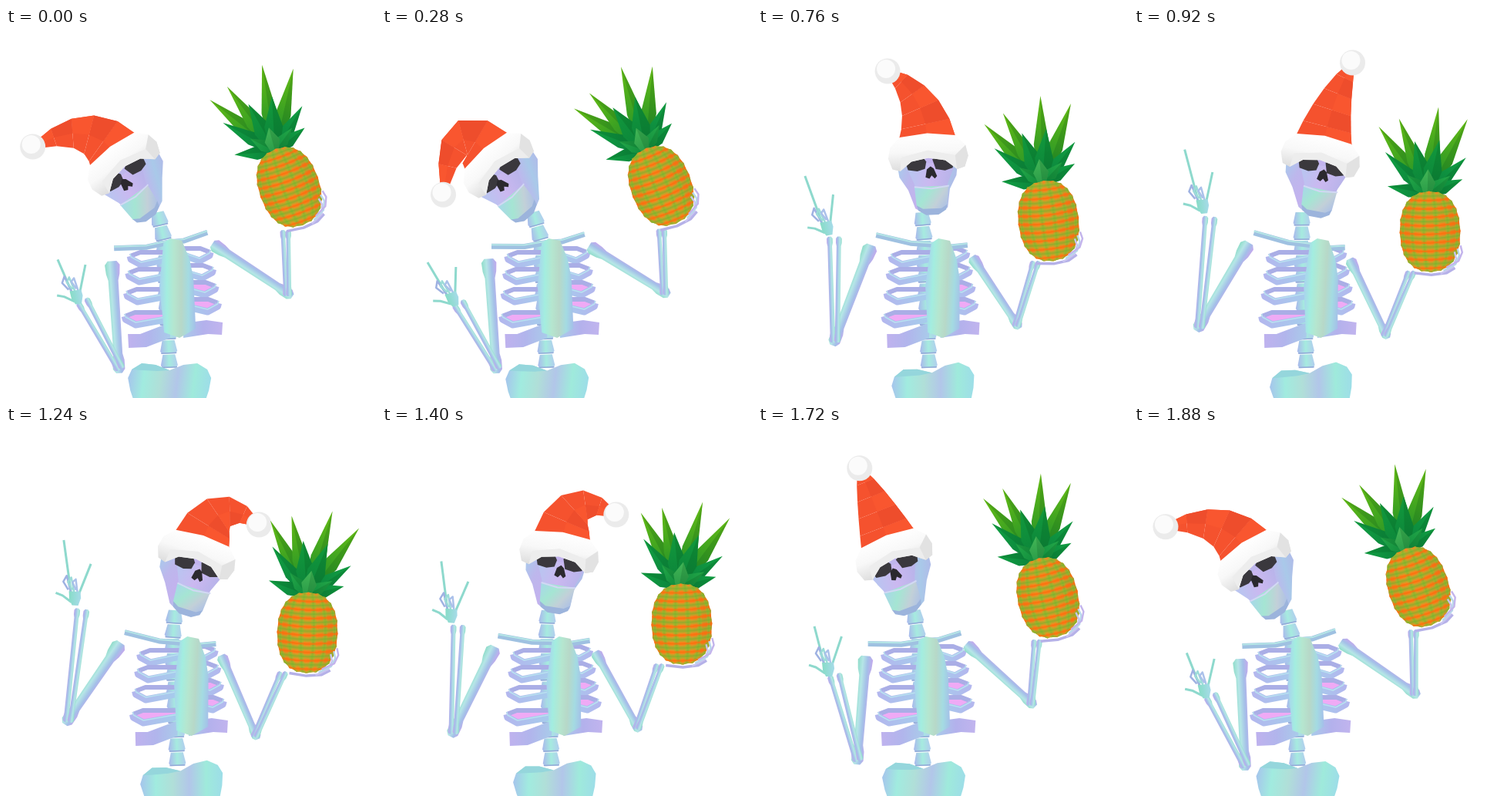
Write an HTML page with a canvas that moves like this. It is 480 px wide and 480 px high and loops after 1920 ms.

```html
<!DOCTYPE html>
<html>
<head>
<meta charset="utf-8">
<style>
html, body { margin: 0; height: 100%; overflow: hidden; background: #fff; }
canvas { display: block; }
</style>
</head>
<body>
<canvas id="stage" width="480" height="480"></canvas>
<script>
const ctx = document.getElementById('stage').getContext('2d');
const LOOP = 1920, STEP = 40, RAD = Math.PI / 180;
let theta = 0; // phase of the dance, in degrees

const sin = deg => Math.sin(deg * RAD), cos = deg => Math.cos(deg * RAD);
// Sways from 0 to 1 and back once per loop; loose parts trail by a lag in degrees.
const sway = lag => (1 - cos(theta - lag)) / 2;
const lerp = (a, b, u) => a + (b - a) * u;
const mix = (a, b, u) => [lerp(a[0], b[0], u), lerp(a[1], b[1], u)];
const shift = (p, x, y) => [p[0] + x, p[1] + y];
const polar = (p, r, deg) => shift(p, r * cos(deg), r * sin(deg));
const heading = (a, b) => Math.atan2(b[1] - a[1], b[0] - a[0]) / RAD;
// Completes a right half, listed from top to bottom, with its reflection.
const mirror = half => [...half, ...half.map(([x, y]) => [-x, y]).reverse()];

function grad(x0, y0, x1, y1, ...colors) {
  const g = ctx.createLinearGradient(x0, y0, x1, y1);
  colors.forEach((c, i) => g.addColorStop(i / (colors.length - 1), c));
  return g;
}

function trace(pts) {
  ctx.beginPath();
  pts.forEach(p => ctx.lineTo(p[0], p[1]));
}

function poly(pts, fill) {
  trace(pts);
  ctx.closePath();
  ctx.fillStyle = fill;
  ctx.fill();
}

function line(pts, width, color) {
  trace(pts);
  ctx.lineWidth = width;
  ctx.strokeStyle = color;
  ctx.stroke();
}

function disc([x, y], r, color) {
  ctx.beginPath();
  ctx.arc(x, y, r, 0, 7);
  ctx.fillStyle = color;
  ctx.fill();
}

function within([x, y], deg, draw) {
  ctx.save();
  ctx.translate(x, y);
  ctx.rotate(deg * RAD);
  draw();
  ctx.restore();
}

// Shifts the top of the chest by one amount and its bottom by another.
function slant(top, bottom, draw) {
  const s = (bottom - top) / 120;
  ctx.save();
  ctx.transform(1, 0, s, 1, top - s * 280, 0);
  draw();
  ctx.restore();
}

function bone(a, b, w, knob = 1.3) {
  const L = Math.hypot(b[0] - a[0], b[1] - a[1]), k = w * knob, e = w * 1.3;
  within(a, heading(a, b), () => {
    const half = [[-e, k * .6], [-e * .4, k], [e, k * .9], [e * 2, w], [L - e * 2, w * .9],
      [L - e, w * 1.2], [L + e * .4, w * 1.2], [L + e, w * .6]];
    poly([...half, ...half.map(([x, y]) => [x, -y]).reverse()],
      grad(0, -k, 0, k, '#c3a9ed', '#a4bfe8', '#b5e6e6', '#8fdcc9'));
  });
}

function spine(a, b, count) {
  const h = Math.hypot(b[0] - a[0], b[1] - a[1]) / count;
  for (let i = 0; i < count; i++)
    within(mix(a, b, (i + .5) / count), heading(a, b) - 90, () => {
      poly(mirror([[8, -h / 2], [11, h * .25], [9, h / 2 - 1]]),
        grad(-11, 0, 11, 0, '#a9b8ec', '#a6ebdf', '#b1cdee'));
      line([[-10, h * .4], [10, h * .4]], 1.5, '#93a9d8');
    });
}

function rib(x, y, inner, hollow) {
  const d = Math.sign(inner - x);
  const back = [[inner, y - 5], [x + 16 * d, y - 5], [x + 3 * d, y]];
  const front = [[x + 3 * d, y], [x + 4 * d, y + 4], [x + 17 * d, y + 11], [inner, y + 3]];
  if (hollow) poly([...back, ...front], '#efaaf5');
  line(back, 6, '#aaaee6');
  line(front, 9, grad(x, 0, inner, 0, '#b3b7ee', '#a5cdec'));
  line(front.map(p => shift(p, 0, -3)), 1.5, '#b9e1f0');
}

function ribs(turn) {
  slant(15 * turn, 11 * turn, () => {
    for (let i = 0; i < 4; i++) rib(158 - 2.3 * i, 296 + 20 * i + 2 * i * i, 213, i == 3);
    poly([[158, 397], [174, 397], [213, 382], [213, 402], [182, 414], [159, 415]],
      grad(158, 0, 213, 0, '#bfb2ee', '#b1b5ec', '#a9cbea'));
  });
  slant(7 * turn, 8 * turn, () => {
    for (let i = 0; i < 4; i++) rib(268 + 3.5 * i, 291 + 22 * i, 228, i > 1);
    poly([[230, 383], [260, 379], [281, 382], [280, 398], [262, 397], [230, 402]],
      grad(230, 0, 281, 0, '#a9cbea', '#b3b1ec', '#c1b4ee'));
  });
}

function sternum(turn) {
  slant(25 * turn, 18 * turn, () => {
    poly([[204, 279], [213, 273], [228, 276], [238, 300], [243, 325], [246, 390], [225, 402],
      [205, 395], [199, 335]],
      grad(199, 0, 246, 0, '#a9d2ee', '#a3ede0', '#b5e6cf', '#b7d8c8', '#a4dbe2', '#a4bfe9'));
  });
}

function pelvis(turn) {
  within([212 + 16 * turn, 442 + 4 * turn], -9 * turn, () => {
    poly(mirror([[0, 2], [18, -5], [36, -7], [49, 1], [54, 12], [51, 28], [43, 52]]),
      grad(-54, 0, 54, 14, '#a6c2ed', '#a1ebdf', '#b0dfd8', '#b2c6e9', '#9feadb', '#9ddde8'));
    poly([[-49, 1], [-36, -7], [-18, -5], [0, 2], [-16, 3], [-36, 2]], '#95d6dc');
  });
}

function collar(turn) {
  const mid = [211 + 20 * turn, 278 + 4 * turn];
  for (const end of [[140 + 16 * turn, 286 - 21 * turn], [261 + 13 * turn, 265 + 20 * turn]]) {
    const pts = [end, shift(mix(end, mid, .6), 0, 3), mid];
    line(pts, 7, '#9fc1e1');
    line(pts.map(p => shift(p, 0, -2)), 2, '#b5e6e6');
  }
}

function leftArm(turn, lift) {
  const shoulder = mix([138, 311], [145, 285], turn);
  const elbow = [151 - 73 * lift, 440 - 64 * lift ** 1.6];
  const wrist = [101 - 3 * lift, 365 - 129 * lift];
  const palm = shift(wrist, -9, -7 - 11 * lift);
  const index = [67 - 10 * sin(theta), 311 - 170 * lift];
  const pinky = [103 - 9 * sin(theta), 316 - 143 * lift];
  bone(shoulder, elbow, 6.5, 1.5);
  const across = heading(elbow, wrist) + 90;
  for (const side of [-1, 1]) bone(polar(elbow, 3 * side, across), polar(wrist, 6 * side, across), 3.2);

  const aim = heading(palm, mix(index, pinky, .5)), mint = '#8ed9cd';
  for (const [tip, side] of [[index, -1], [pinky, 1]])
    line([polar(polar(palm, 6, aim), 5 * side, aim + 90), tip], 3, mint);
  within(palm, aim + 90, () => {
    for (let n = 0; n < 3; n++)
      line([[4 * n - 4, -3], [6 * n - 12, 2 * n - 29], [6 * n - 16, -21], [5 * n - 9, -11]], 2.5,
        ['#9fb2e2', '#9cdcd8', '#abc1ea'][n]);
    line([[-4, 5], [-16, -3], [-25, -6]], 3, mint);
    poly([[-8, -9], [7, -9], [8, -1], [5, 9], [-3, 9], [-7, 1]], grad(-8, 0, 8, 0, '#86dcc6', '#a7dbe9'));
  });
}

function rightArm(turn, lift) {
  const shoulder = mix([274, 284], [283, 306], turn);
  const elbow = mix([368, 340], [322, 403], lift);
  const wrist = mix([363, 262], [358, 325], lift);
  bone(shoulder, elbow, 6 - lift, 1.45);
  for (const side of [-1, 1]) bone(shift(elbow, 2 * side, 0), shift(wrist, 3.5 * side, 0), 3);
}

// Origin at the nose; c slides the cranium as the face turns away.
function skull(c) {
  const outline = side => [[25, -38, 1], [40, -18, 1], [37, 5, 1], [27, 22, .8], [21, 46, .2], [9, 54, 0]]
    .map(([x, y, s]) => [side * x + c * s, y]);
  poly([...outline(1), ...outline(-1).reverse()],
    grad(-40 + c, -10, 40 + c, 20, '#a7ccec', '#bdb7ec', '#c3b2ee', '#a9c9e9', '#b4b3e8'));
  poly(mirror([[8, -12], [30, -5], [22, 14], [20, 22]]), grad(-25, 0, 25, 10, '#bac4f0', '#cbb8f0', '#b9b4ea'));
  poly(mirror([[22, 18], [20, 43], [12, 48]]),
    grad(-20, 20, 20, 48, '#a7d9e6', '#a5e5d3', '#c2d0d8', '#a9bee8'));
  poly(mirror([[12, 47], [20, 42], [18, 49], [8, 55]]), '#9cb4dc');
  line([[-22, 18], [0, 21], [23, 18]], 2, '#d2d8f4');
  for (const side of [-1, 1])
    within([side * 18 + c * .33, -11], 0, () =>
      poly([[-14, -6], [-5, -11], [10, -9], [14, -3], [12, 6], [2, 9], [-10, 7]], '#3a383d'));
  poly([[0, -8], [4, -5], [8, 5], [5, 8], [1, 4], [-2, 8], [-7, 6], [-5, -4]], '#2b292e');
}

function head(chest, lift) {
  const nose = polar(chest, 89, -128 + 62 * lift);
  const tilt = lerp(-42, 19, sway(35)), c = 22 - 37 * lift;
  const above = h => polar(polar(nose, c * .65, tilt), h, tilt - 90);
  within(nose, tilt, () => skull(c));

  const swing = lerp(-202, -22, sway(53));
  const reach = 109 + 24 * cos(2 * theta + 39) - 8 * sin(theta);
  const pom = polar([153 + 90 * lift, 186 - 23 * lift], reach, swing);
  cone(above(40), above(150 - .4 * reach), pom, tilt);
  within(above(26), tilt, band);
  disc(pom, 16.5, '#ebebeb');
  disc(shift(pom, -2, -3), 12, '#fbfbfb');
}

function band() {
  poly(mirror([[0, -25], [36, -21], [49, -8], [52, 6], [47, 20], [37, 23], [22, 11], [0, 7]]),
    grad(0, -24, 0, 22, '#fff', '#f8f8f8', '#dedede'));
  poly(mirror([[0, -3], [35, 5], [37, 23], [22, 11], [0, 7]]), '#ededed');
  poly([[49, -8], [52, 6], [47, 20], [37, 23], [35, 5]], '#e2e2e2');
}

// Bent cone whose middle line runs from the band to the pom.
function cone(base, ctrl, tip, tilt) {
  const rows = [];
  for (let i = 0; i <= 5; i++) {
    const u = i / 5, a = mix(base, ctrl, u), b = mix(ctrl, tip, u), p = mix(a, b, u);
    const across = i ? heading(a, b) + 90 : tilt, w = 35 * (1 - u) ** .85 + 3;
    rows.push([polar(p, -w, across), p, polar(p, w, across)]);
  }
  for (let i = 0; i < 5; i++) {
    const [a, b] = [rows[i], rows[i + 1]];
    poly([a[0], a[2], b[2], b[0]], '#f5522e');
    poly([a[1], a[2], b[2], b[1]], i % 2 ? '#ee4d2c' : '#f9562f');
  }
}

function leaf([x, y], w, light, dark) {
  const L = Math.hypot(x, y);
  within([0, 0], heading([0, 0], [x, y]), () => {
    poly([[0, -w * .5], [L * .45, -w], [L, 0], [L * .45, w], [0, w * .5]], grad(0, 0, L, 0, dark, light));
    poly([[0, 0], [L, 0], [L * .45, w], [0, w * .5]], 'rgba(0,70,20,.18)');
  });
}

function crown() {
  [[-65, -86], [50, -98], [-39, -97], [12, -113]].forEach(p => leaf(p, 10, '#66bd14', '#15882f'));
  [[-56, -53], [49, -48], [45, -20], [-52, -9]].forEach(p => leaf(p, 9, '#11a043', '#0b7f3b'));
  [[-18, -68], [14, -70]].forEach(p => leaf(p, 12, '#129a3c', '#0b813a'));
  [[-27, -24], [29, -24]].forEach(p => leaf(p, 8, '#23a748', '#108a3c'));
  leaf([0, -32], 10, '#43b656', '#2a9c48');
}

function plaid() {
  const span = [-56, -42, -28, -14, 0, 14, 28, 42, 56];
  const bulge = y => Math.sqrt(1.1 - (y / 62) ** 2);
  for (let a = -77; a <= 77; a += 22) {
    const pts = span.map(y => [41 * sin(a) * bulge(y), y]);
    line(pts, 1 + 6 * cos(a), 'rgba(150,190,48,.5)');
    line(pts, 1 + 2 * cos(a), 'rgba(90,180,50,.35)');
  }
  for (let y = -50; y <= 50; y += 11) {
    const pts = span.map(x => [x, y + 4 * cos(x * 2)]);
    line(pts, 6, 'rgba(150,190,48,.5)');
    line(pts, 2.5, 'rgba(90,180,50,.35)');
    line(pts.map(p => shift(p, 0, 5.5)), 2.5, 'rgba(255,110,10,.7)');
  }
}

function pineapple(lift) {
  const center = [lerp(362, 391, sway(51)), 202 + 69 * lift], lean = lerp(-22, 2, sway(38));
  within(shift(polar(center, 49, lean - 90), -2, 0), lerp(-22.5, 11, sway(58)), crown);
  within(center, lean, () => {
    const round = (v, r) => r * Math.sign(v) * Math.abs(v) ** .85;
    const rim = [];
    for (let a = 0; a < 360; a += 5) {
      const bump = 1 + .014 * cos(a * 24);
      rim.push([round(cos(a), 39 * bump), round(sin(a), 52 * bump)]);
    }
    ctx.save();
    poly(rim, grad(-39, 0, 39, 0, '#ee751b', '#f58a20', '#f58420', '#e8701c'));
    ctx.clip();
    plaid();
    ctx.restore();

    line([[-22, 53], [0, 56], [20, 54], [31, 48]], 3.5, '#b5b1e8');
    for (let i = 0; i < 3; i++)
      line([[12, 55], [28, 47], [33, 36], [31, 27]].map(p => shift(p, 4 * i, -4 * i)),
        2.4, ['#c9c4f0', '#b7d9ea', '#c3b4ec'][i]);
  });
}

function draw() {
  ctx.fillStyle = '#fff';
  ctx.fillRect(0, 0, 480, 480);
  ctx.lineJoin = 'round';
  const turn = sway(11), lift = sway(29);
  const chest = [205 + 13 * turn, 276];
  spine(chest, [212 + 12 * turn, 442], 9);
  pelvis(turn);
  ribs(turn);
  leftArm(turn, lift);
  rightArm(turn, lift);
  collar(turn);
  spine([195 + 25 * lift, 239], chest, 2);
  sternum(turn);
  head(chest, lift);
  pineapple(lift);
}

const start = performance.now();
function loop() {
  const t = Math.floor((performance.now() - start) / STEP) * STEP;
  theta = t % LOOP / LOOP * 360;
  draw();
  requestAnimationFrame(loop);
}
loop();
</script>
</body>
</html>
```
